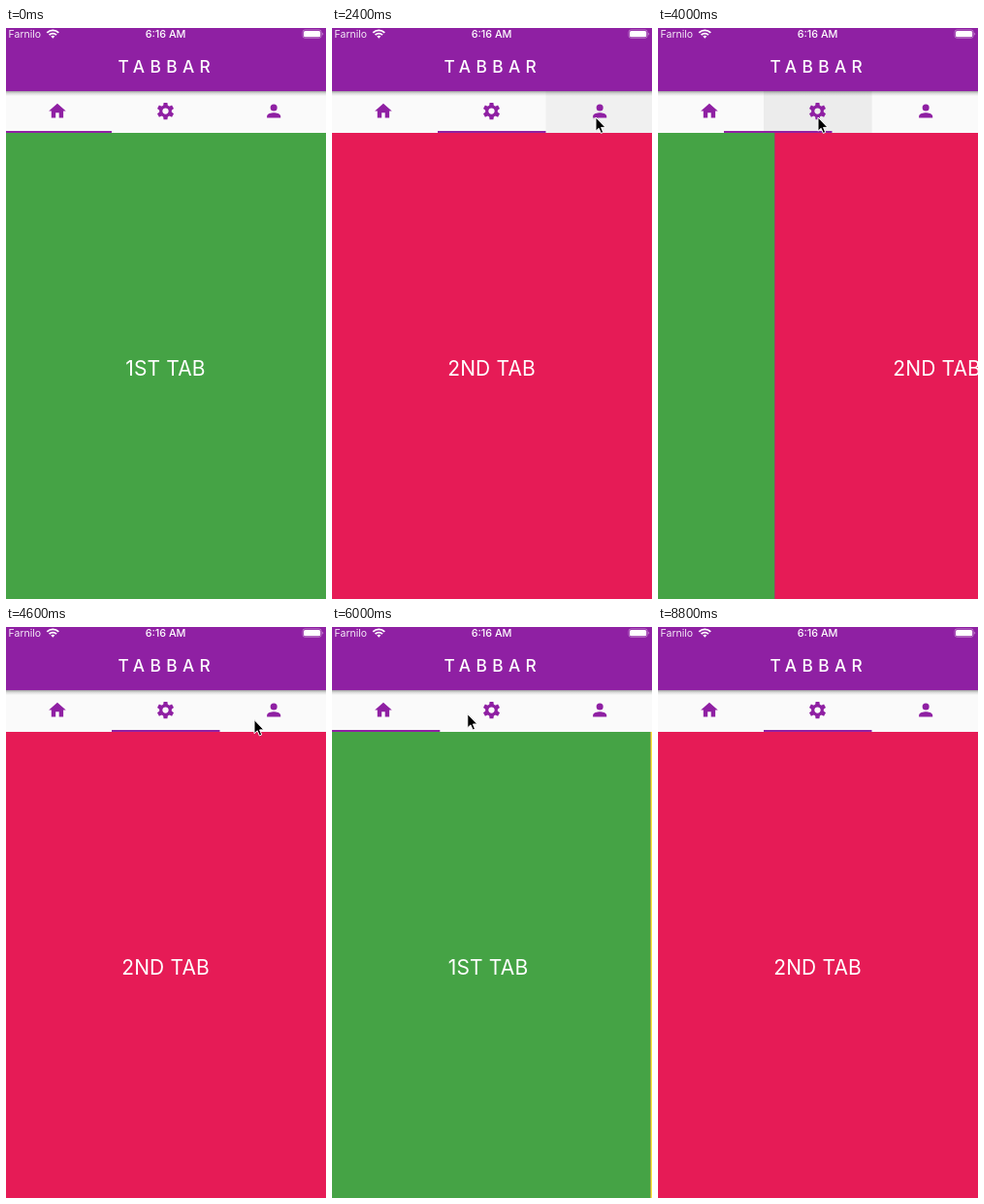
These frames come from a looping animation (330x588 px, 8.9 s). An HTML page:

```html
<!DOCTYPE html>
<html lang="en">
<head>
<meta charset="utf-8">
<title>Tab bar</title>
<style>
  html, body { margin: 0; width: 100%; height: 100%; overflow: hidden; background: #8f20a3; }
  svg { display: block; width: 330px; height: 588px; font-family: Inter, Roboto, sans-serif; }
  .page text { font-size: 21px; letter-spacing: .15px; text-anchor: middle; }
  .status { font-size: 10.5px; fill: #fff; }
</style>
</head>
<body>
<svg viewBox="0 0 330 588">
  <defs>
    <linearGradient id="shade" x2="0" y2="1">
      <stop offset="0" stop-opacity=".36"/>
      <stop offset=".45" stop-opacity=".13"/>
      <stop offset="1" stop-opacity="0"/>
    </linearGradient>
    <clipPath id="tabClip"><rect id="tabClipRect" y="65" width="111.5" height="43"/></clipPath>
  </defs>

  <g id="pages"></g>

  <rect y="65" width="330" height="43" fill="#fafafa"/>
  <g clip-path="url(#tabClip)">
    <rect id="highlight" y="65" width="330" height="43" fill="#bcbcbc"/>
    <circle id="ripple" fill="#c8c8c8"/>
  </g>

  <g fill="#8f20a3">
    <path transform="translate(42.4 75) scale(.88)" d="M10 20v-6h4v6h5v-8h3L12 3 2 12h3v8z"/>
    <g id="gear" transform="translate(164.5 85.6) scale(.88)">
      <circle r="5.4" fill="none" stroke="#8f20a3" stroke-width="3.6"/>
    </g>
    <path transform="translate(265.6 75) scale(.88)" d="M12 12a4 4 0 1 0 0-8 4 4 0 0 0 0 8zm0 2c-2.7 0-8 1.3-8 4v2h16v-2c0-2.7-5.3-4-8-4z"/>
    <rect id="indicator" y="106" width="111.5" height="2"/>
    <rect width="330" height="65"/>
  </g>
  <rect y="65" width="330" height="5" fill="url(#shade)"/>

  <text x="115.6" y="46" font-size="17.3" font-weight="500" letter-spacing="5.4" fill="#fff">TABBAR</text>
  <text class="status" x="2.6" y="10" fill-opacity=".9">Farnilo</text>
  <text class="status" x="164.6" y="10" style="font-size:10.8px" font-weight="500" text-anchor="middle">6:16 AM</text>

  <g fill="none" stroke="#fff" stroke-width="1.9">
    <path d="M42.3 4.9a8.4 8.4 0 0 1 12 0M44.6 7.2a5.2 5.2 0 0 1 7.4 0"/>
    <path d="M46.3 8.6a2.9 2.9 0 0 1 4 0L48.3 10.7z" fill="#fff" stroke="none"/>
  </g>
  <rect x="306" y="1.9" width="19.2" height="8.4" rx="2.4" fill="none" stroke="#fff" stroke-opacity=".4" stroke-width=".9"/>
  <rect x="307" y="2.9" width="17.2" height="6.4" rx="1.5" fill="#fff"/>
  <path d="M326.3 4.7a1.6 1.6 0 0 1 0 2.9z" fill="#fff" fill-opacity=".5"/>

  <path id="cursor" d="M0 0V14.2L3.2 11.3 5.4 16.4 7.7 15.4 5.6 10.4H10Z" stroke="#fff" stroke-width="1" stroke-linejoin="round"/>
</svg>

<script>
const LOOP = 8900, STEP = 100;
const LEFT = -2.5, WIDTH = 334.5, TAB = WIDTH / 3;
const TOP = 65, BOTTOM = 108;
const SLIDE = 300, PRESS = 90, SPREAD = 75, FADE = 200;

const PAGES = [
  ['1ST TAB', '#45a345', '#fff'],
  ['2ND TAB', '#e61b56', '#fff'],
  ['3RD TAB', '#f8e733', '#222'],
];

// [release time, tab tapped]
const TAPS = [[1566.5, 1], [2440, 2], [3317, 0], [3890, 1], [5120, 2], [5740, 0], [6182, 1]];

// [time, x, y] of the pointer tip
const PATH = [
  [1460, 156, 76.5], [1850, 156, 76.5], [2300, 272, 92], [2600, 272, 92],
  [3150, 77, 93.5], [3450, 77, 93.5], [3760, 165, 92], [4100, 165, 92],
  [4550, 256, 95.5], [4900, 256, 95.5], [5050, 262, 94], [5250, 262, 94],
  [5620, 43, 95], [5820, 43, 95], [6080, 168, 88], [6240, 170, 86],
  [6400, 184, 77.5], [6700, 334, 40],
];

const $ = id => document.getElementById(id);
const clamp = v => Math.min(1, Math.max(0, v));

function add(parent, tag, attrs, text) {
  const el = document.createElementNS('http://www.w3.org/2000/svg', tag);
  set(el, attrs);
  if (text) el.textContent = text;
  return parent.appendChild(el);
}

function set(el, attrs) {
  for (const key in attrs) el.setAttribute(key, attrs[key]);
}

// cubic-bezier(.25, .1, .25, 1)
function ease(x) {
  let lo = 0, hi = 1;
  for (let i = 0; i < 24; i++) {
    const u = (lo + hi) / 2, v = 1 - u;
    if (.75 * v * u + u * u * u < x) lo = u; else hi = u;
  }
  const v = 1 - lo;
  return .3 * v * v * lo + 3 * v * lo * lo + lo ** 3;
}

const pages = PAGES.map(([label, fill, ink]) => {
  const g = add($('pages'), 'g', { class: 'page' });
  add(g, 'rect', { y: BOTTOM, width: WIDTH, height: 480, fill });
  add(g, 'text', { x: WIDTH / 2 - .2, y: 357.5, fill: ink }, label);
  return g;
});

for (let a = 0; a < 360; a += 60) {
  add($('gear'), 'path', { d: 'M-2.2-9.9h4.4l.6 4.6h-5.6z', transform: `rotate(${a})` });
}

function drawPages(t) {
  let from = 0, to = 0, p = 1;
  for (const [start, tab] of TAPS) {
    if (t < start) break;
    from = to;
    to = tab;
    p = ease(clamp((t - start) / SLIDE));
  }
  const dir = Math.sign(to - from);
  pages.forEach((page, i) => {
    const x = i === to ? dir * (1 - p) * WIDTH : -dir * p * WIDTH;
    const shown = i === to || (i === from && p < 1);
    set(page, { transform: `translate(${LEFT + x} 0)`, visibility: shown ? 'visible' : 'hidden' });
  });
  set($('indicator'), { x: LEFT + (from + (to - from) * p) * TAB });
}

function pointer(t) {
  const i = PATH.findIndex(k => k[0] > t);
  if (i < 1) return null;
  const [t0, x0, y0] = PATH[i - 1], [t1, x1, y1] = PATH[i];
  const u = (t - t0) / (t1 - t0), s = u * u * (3 - 2 * u);
  return [x0 + (x1 - x0) * s, y0 + (y1 - y0) * s];
}

function drawInk(t) {
  const tap = TAPS.find(([time]) => t >= time - PRESS && t < time + FADE);
  let glow = 0, alpha = 0, r = 0;
  if (tap) {
    const [time, tab] = tap;
    const [cx, cy] = pointer(time);
    const x = LEFT + tab * TAB;
    const held = Math.min(t - time + PRESS, PRESS), after = Math.max(0, t - time);
    const reach = Math.hypot(Math.max(cx - x, x + TAB - cx), Math.max(cy - TOP, BOTTOM - cy));
    const grown = held / 1000;
    const fade = 1 - after / FADE;
    r = reach * (grown + (1 - grown) * clamp(after / SPREAD));
    glow = .16 * clamp(held / 50) * fade;
    alpha = .44 * fade;
    set($('tabClipRect'), { x });
    set($('ripple'), { cx, cy });
  }
  set($('highlight'), { opacity: glow });
  set($('ripple'), { r, opacity: alpha });
}

function drawCursor(t) {
  const at = pointer(t);
  set($('cursor'), {
    visibility: at ? 'visible' : 'hidden',
    transform: at ? `translate(${at[0]} ${at[1]})` : '',
  });
}

function render(ms) {
  const t = Math.floor(ms % LOOP / STEP) * STEP;
  drawPages(t);
  drawInk(t);
  drawCursor(t);
}

const begin = performance.now();
function tick() {
  render(performance.now() - begin);
  requestAnimationFrame(tick);
}
tick();
</script>
</body>
</html>
```
